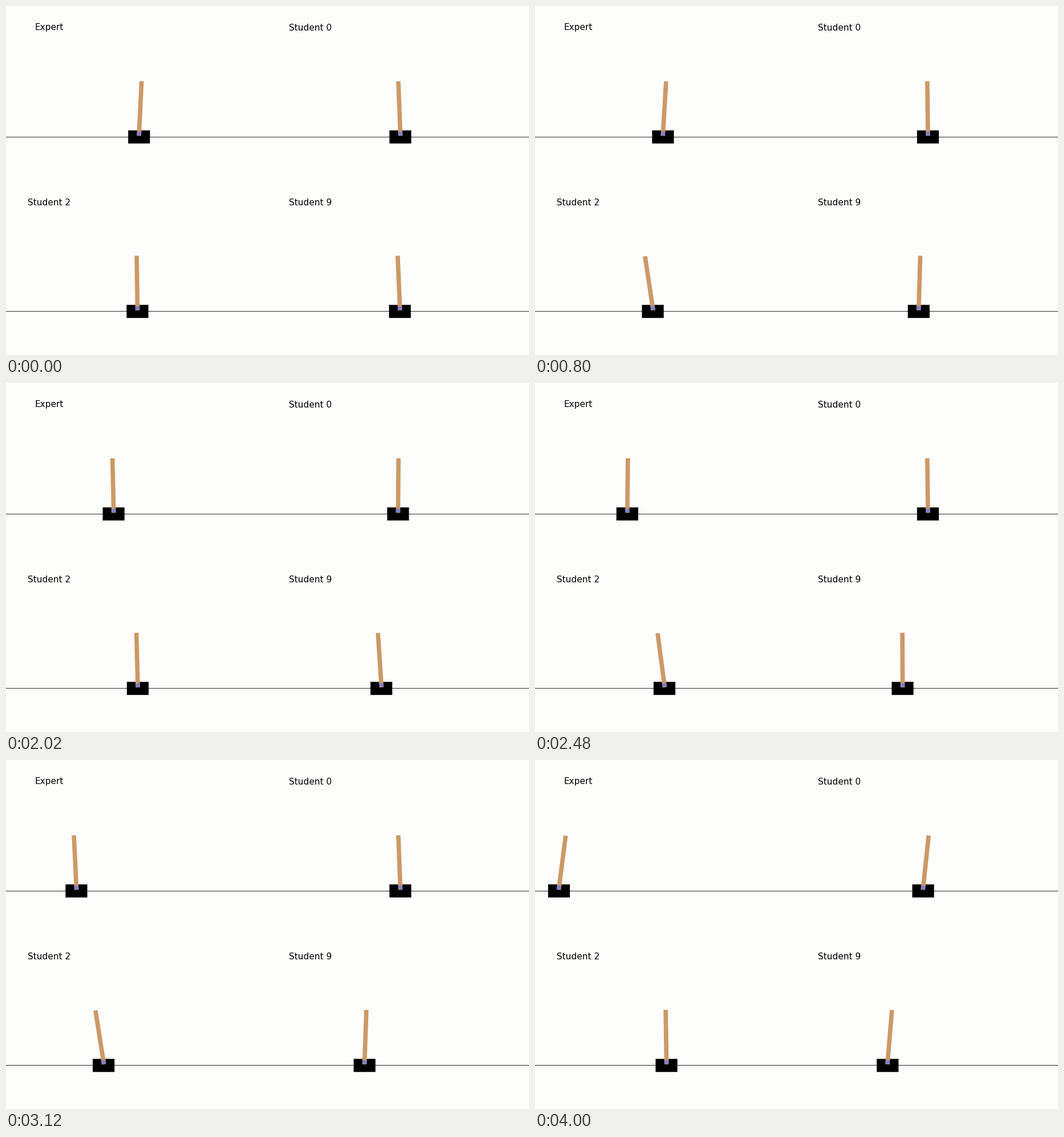
Animation of 917x611 px, one loop 4.02 s. Source, as a matplotlib script:

```python
import numpy as np
import matplotlib.pyplot as plt
from matplotlib.animation import FuncAnimation
from matplotlib.patches import Circle, Polygon, Rectangle

W, H, DPI = 917, 611, 64
FRAMES, STEP = 201, 20
S = W / 2 / 600               # scale of the 600 x 400 scene

UNIT = W / 2 / 4.8            # pixels per metre
GRAVITY = 9.8 * UNIT
PIVOT = UNIT * 2 / 3          # axle to centre of percussion
CART_W, CART_H = 50 * S, 30 * S
POLE_W, POLE_TOP, AXLE_R = 10 * S, 120 * S, 5 * S


def balance(t, start, speed, mean, sway=0, freq=1, phase=0, lean=0, tau=1, t1=0):
    """Cart x and pole tilt for a tilt of mean + sway wave + exponential lean.

    The centre of percussion y obeys y'' = g * tilt, which integrates directly.
    """
    w = 2 * np.pi * freq
    wave = sway * np.cos(w * t + 2 * np.pi * phase)
    push = lean * np.exp((t - t1) / tau)
    tilt = mean + wave + push
    y = start + speed * t + GRAVITY * (mean * t**2 / 2 - wave / w**2 + push * tau**2)
    return y - PIVOT * tilt, tilt


def expert(t):
    return balance(t, 236.7, -0.8, -0.025, sway=0.09, freq=2.305, phase=0.1,
                   lean=0.192, tau=0.145, t1=4)


def steady(t):
    return balance(t, 687.5, -14.7, -0.0024, sway=0.075, freq=1.45, phase=-0.34,
                   lean=0.158, tau=0.285, t1=4)


def runaway(t):
    """Leans left until the cart leaves the rail, then restarts."""
    return balance(t % 2, 217.4, 33.4, -0.16, lean=0.144, tau=-0.3)


def topple(t):
    """Constant push to the left until the pole falls, then a restart."""
    k = round(t / 0.02) % 12
    n = k * (k - 1) / 2
    return 691.4 - 0.05 * k - 0.3725 * n, np.radians(-2.2 - 0.13 * k + 0.331 * n)


fig = plt.figure(figsize=(W / DPI, H / DPI), dpi=DPI, facecolor="#fdfdfc")
ax = fig.add_axes([0, 0, 1, 1])
ax.set_xlim(0, W)
ax.set_ylim(H, 0)
ax.axis("off")


def add(patch, color, z):
    patch.set(facecolor=color, linewidth=0, zorder=z, snap=False)
    return ax.add_patch(patch)


class CartPole:
    def __init__(self, label, lx, ly, rail, pose):
        self.axle_y, self.pose = rail - CART_H / 4, pose
        self.cart = add(Rectangle((0, rail - CART_H / 2), CART_W, CART_H), "black", 2)
        self.pole = add(Polygon(np.zeros((4, 2))), "#cc9966", 3)
        self.axle = add(Circle((0, 0), AXLE_R), "#8080cc", 4)
        ax.text(lx, ly, label, family="DejaVu Sans", size=20.1 * S * 72 / DPI,
                color="black", va="baseline")

    def move(self, t):
        x, tilt = self.pose(t)
        base = np.array([x, self.axle_y])
        along = np.array([np.sin(tilt), -np.cos(tilt)])
        side = np.array([np.cos(tilt), np.sin(tilt)]) * POLE_W / 2
        low, top = base - along * AXLE_R, base + along * POLE_TOP
        self.cart.set_x(x - CART_W / 2)
        self.pole.set_xy([low - side, top - side, top + side, low + side])
        self.axle.center = base


RAILS = (229.2, 534.7)
for rail in RAILS:
    add(Rectangle((0, int(rail)), W, 1), "#2c2c2c", 1)

panels = [
    CartPole("Expert", 50.7, 42, RAILS[0], expert),
    CartPole("Student 0", 496.3, 43.4, RAILS[0], topple),
    CartPole("Student 2", 37.9, 349, RAILS[1], runaway),
    CartPole("Student 9", 496.3, 349, RAILS[1], steady),
]


def draw(k):
    for panel in panels:
        panel.move(k * STEP / 1000)
    return []


anim = FuncAnimation(fig, draw, frames=FRAMES, interval=STEP, repeat=True)
plt.show()
```
